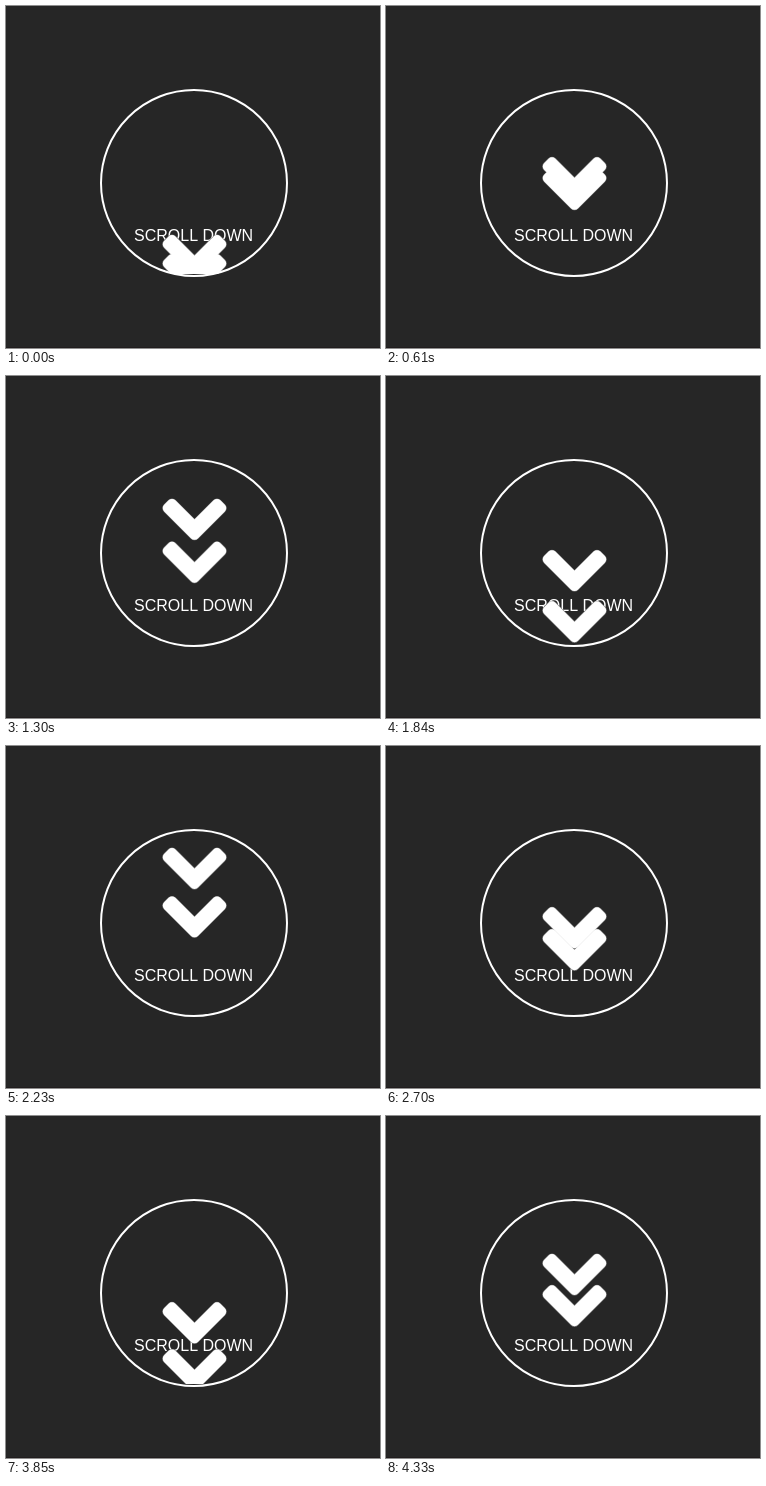
An HTML page that plays this animation: 374 px wide and 342 px high, repeating every 4410 ms.

```html
<!DOCTYPE html>
<html lang="en">
<head>
<meta charset="utf-8">
<title>Scroll down</title>
<style>
  html, body { margin: 0; width: 100%; height: 100%; overflow: hidden; background: #262626; }
  svg { display: block; }
  text { font: 16px "Liberation Sans", Arial, sans-serif; font-kerning: none; fill: #fff; }
  #arrows { stroke-linejoin: round; }
  .rim { fill: #888; stroke: #888; stroke-width: 10.4; }
  .face { fill: #fff; stroke: #fff; stroke-width: 9.4; }
</style>
</head>
<body>
<svg width="374" height="342" viewBox="0 0 374 342">
  <defs>
    <clipPath id="window"><rect x="95" y="84" width="187" height="184"/></clipPath>
    <path id="chevron" d="M161.5 9.5L166 5L188.5 27.5L211 5L215.5 9.5L188.5 36.5Z"/>
  </defs>
  <rect y="341" width="374" height="1" fill="#211d1e"/>
  <text x="128" y="235">SCROLL DOWN</text>
  <g id="arrows" clip-path="url(#window)">
    <g class="rim">
      <use class="lower" href="#chevron"/>
      <use class="upper" href="#chevron"/>
    </g>
    <g class="face">
      <use class="lower" href="#chevron"/>
      <use class="upper" href="#chevron"/>
    </g>
  </g>
  <circle cx="188" cy="177" r="93" fill="none" stroke="#fff" stroke-width="2"/>
</svg>
<script>
const LOOP = 4410, STEP = 76.67, CYCLE = 981.3, VISIBLE = 835;
const REST = 161, TRAVEL = 88, ENTER_TIME = 400;

// Times in ms within a cycle; sway is a short bounce around the resting place
const arrows = {
  upper: { enter: -155, leave: 527, leaveTime: 284, sway: -10, swayAt: 352, swayTime: 105 },
  lower: { enter: -300, leave: 315, leaveTime: 435, sway: 8, swayAt: 107, swayTime: 160 }
};

const group = document.getElementById("arrows");

function ease(u) {
  return (1 - Math.cos(Math.PI * Math.min(1, Math.max(0, u)))) / 2;
}

function topEdge(a, phase) {
  const entered = ease((phase - a.enter) / ENTER_TIME);
  const left = ease((phase - a.leave) / a.leaveTime);
  const bump = ease(1 - Math.abs(phase - a.swayAt) / a.swayTime);
  return REST + TRAVEL * (entered - 1 + left) + a.sway * bump;
}

// The motion is stepped, with one short stall
function stepAt(t) {
  if (t < 2590) return Math.min(30, Math.floor((t + 7) / STEP));
  return Math.min(56, 34 + Math.floor((t - 2615) / 77.2));
}

function draw(now) {
  const elapsed = (stepAt(now % LOOP) - 29) * STEP;
  const phase = (elapsed + 3 * CYCLE + 0.01) % CYCLE;
  group.style.display = phase < VISIBLE ? "" : "none";
  for (const name in arrows) {
    const y = topEdge(arrows[name], phase).toFixed(2);
    for (const use of group.querySelectorAll("." + name)) use.setAttribute("y", y);
  }
  requestAnimationFrame(() => draw(performance.now() - start));
}

const start = performance.now();
draw(0);
</script>
</body>
</html>
```
